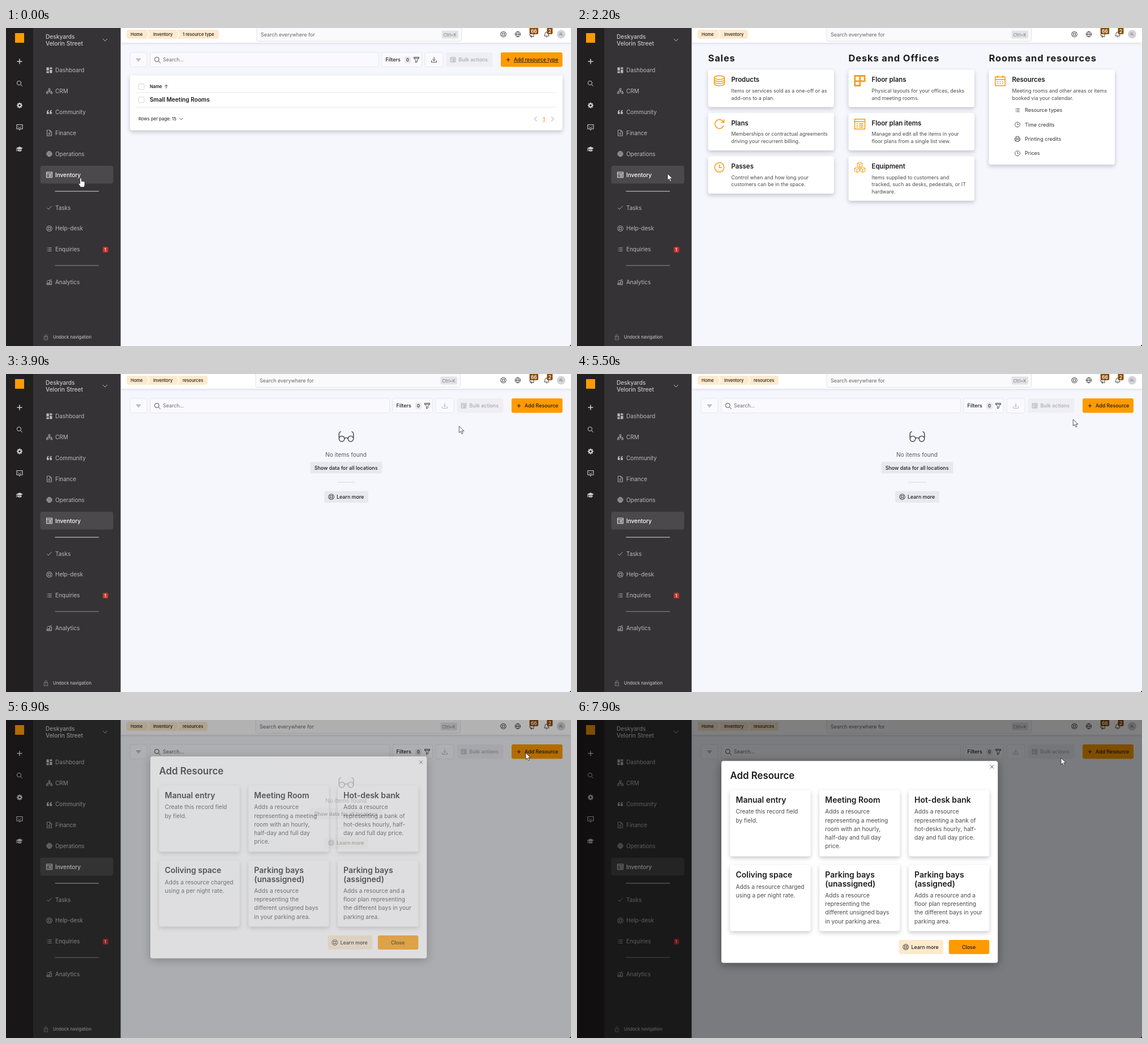
Write an HTML page that moves like this. It is 998x561 px and loops after 8000 ms.

```html
<!DOCTYPE html>
<html lang="en">
<head>
<meta charset="utf-8">
<title>Workspace admin</title>
<style>
html, body { margin: 0; width: 100%; height: 100%; overflow: hidden; background: #f6f7fd; }
svg { display: block; width: 998px; height: 561px; font-family: Inter, "Noto Sans", sans-serif; font-optical-sizing: none; }
text { white-space: pre; }
.card { fill: #fff; filter: drop-shadow(0 var(--drop, 3px) var(--blur, 3.5px) rgba(30, 30, 50, .24)); }
.anim { animation: 8s -5ms infinite step-end; }
.list { animation-name: list; }
.hub { animation-name: hub; }
.empty { animation-name: empty; }
.lift { animation-name: lift; }
.link { animation-name: link; }
.add { animation-name: add; }
.dim { animation-name: dim; }
.modal { animation-name: modal; }
.cursor { animation-name: cursor; }
.hand { animation-name: hand; }
.arrow { animation-name: arrow; }
@keyframes list { 0% { opacity: 1 } 11.25%, 100% { opacity: 0 } }
@keyframes hub {
  0% { opacity: 0 } 11.25% { opacity: .5 } 12.5% { opacity: .85 }
  13.75% { opacity: 1 } 48.75%, 100% { opacity: 0 }
}
@keyframes empty { 0% { opacity: 0 } 48.75%, 100% { opacity: 1 } }
@keyframes lift {
  0% { translate: 0 0; --drop: 3px; --blur: 3.5px }
  33.75% { translate: 0 -1px; --drop: 7px; --blur: 8px }
  48.75%, 100% { translate: 0 0; --drop: 3px; --blur: 3.5px }
}
@keyframes link {
  0% { text-decoration: none } 33.75% { text-decoration: underline } 48.75%, 100% { text-decoration: none }
}
@keyframes add {
  0% { text-decoration: none } 80% { text-decoration: underline } 86.25%, 100% { text-decoration: none }
}
@keyframes dim { 0% { opacity: 0 } 86.25% { opacity: .6 } 87.5%, 100% { opacity: 1 } }
@keyframes modal {
  0% { opacity: 0; translate: 0 -10px }
  86.25% { opacity: .6; translate: 0 -8px }
  87.5% { opacity: 1; translate: 0 -2.2px; animation-timing-function: steps(5) }
  93.75%, 100% { opacity: 1; translate: 0 0 }
}
@keyframes cursor {
  0% { translate: 132px 265px }
  2.5% { translate: 131.5px 263.5px }
  3.75% { translate: 131.5px 262px }
  26.25% { translate: 135px 261px }
  27.5% { translate: 160px 257px }
  28.75% { translate: 230px 245px }
  30% { translate: 367px 221px }
  31.25% { translate: 566px 183px }
  32.5% { translate: 703px 155px }
  33.75% { translate: 769px 135px }
  35% { translate: 790px 108px }
  36.25% { translate: 799px 96px; animation-timing-function: steps(5) }
  42.5% { translate: 800.5px 92px }
  56.25% { translate: 800.5px 92px; animation-timing-function: steps(5) }
  62.5% { translate: 853px 80px }
  63.75% { translate: 853px 80px; animation-timing-function: steps(6) }
  71.25% { translate: 888px 80px }
  72.5% { translate: 888px 80px; animation-timing-function: steps(9) }
  83.75% { translate: 918px 58px }
  97.5% { translate: 890px 62px }
  98.75%, 100% { translate: 855px 67px }
}
@keyframes hand {
  0% { opacity: 1 } 26.25% { opacity: 0 } 33.75% { opacity: 1 }
  48.75% { opacity: 0 } 80% { opacity: 1 } 86.25%, 100% { opacity: 0 }
}
@keyframes arrow {
  0% { opacity: 0 } 26.25% { opacity: 1 } 33.75% { opacity: 0 }
  48.75% { opacity: 1 } 80% { opacity: 0 } 86.25%, 100% { opacity: 1 }
}
</style>
</head>
<body>
<svg id="stage" viewBox="0 0 998 561"></svg>
<script>
const UI = 0.635; // interface zoom: sizes below are in unzoomed pixels
const ORANGE = '#ff9b00', CREAM = '#fdeacd', INK = '#1d1b1c', SOFT = '#4d4b4d', NAV = '#b9b8b9';

const ring = (x, y, r) => `M${x - r} ${y}a${r} ${r} 0 1 0 ${2 * r} 0a${r} ${r} 0 1 0 ${-2 * r} 0`;
const cube = (x, y) =>
  `M${x} ${y - 2.7}l2.4 1.2v2.8l-2.4 1.3-2.4-1.3v-2.8zM${x - 2.4} ${y - 1.5}l2.4 1.2 2.4-1.2M${x} ${y - .3}v2.9`;

const ICONS = {
  dashboard: 'M-5-5h4.3v5.6h-4.3zM.7-5h4.3v3h-4.3zM-5 1.8h4.3v3.2h-4.3zM.7-.8h4.3v5.8h-4.3z',
  quote: 'M-4.5 3.5V0q0-3.4 3.5-3.8v1.4q-1.6.4-1.6 2.1h1.8v3.8zM.8 3.5V0q0-3.4 3.5-3.8v1.4q-1.6.4-1.6 2.1h1.8v3.8z',
  cap: 'M-6-1.5L0-4.2 6-1.5 0 1.2zM-3.5.6L0 2.2 3.5.6v2.6q-3.5 2-7 0zM-5.5-1h1v5h-1z',
  tree: 'M-1.4-4.5h2.8v2.6h-2.8zM-5 1.8h2.6v2.6h-2.6zM2.4 1.8h2.6v2.6h-2.6zM0-1.9V0M-3.7 1.8V0h7.4v1.8M0 0v3',
  doc: 'M-4-5h5l3 3v7h-8zM1-5v3h3M-2 .3h4M-2 2.5h4',
  chip: ring(0, 0, 4.6) + 'M-2.4-2.4h4.8v4.8h-4.8zM-1-1h2v2h-2zM-1-4.5v2M1-4.5v2M-1 2.5v2M1 2.5v2M-4.5-1h2M-4.5 1h2M2.5-1h2M2.5 1h2',
  table: 'M-5-4.8h10v9.6h-10zM-5-2.3h10M-3.2-.4h1.2M-.6-.4h4M-3.2 1.2h1.2M-.6 1.2h4M-3.2 2.9h1.2M-.6 2.9h4',
  check: 'M-4 .3l2.4 2.7 5.6-5.8',
  buoy: ring(0, 0, 4.8) + ring(0, 0, 2.2) + 'M-3.4-3.4l1.8 1.8M3.4-3.4l-1.8 1.8M-3.4 3.4l1.8-1.8M3.4 3.4l-1.8-1.8',
  list: 'M-4-2.8h1M-2-2.8h6M-4 0h1M-2 0h6M-4 2.8h1M-2 2.8h6',
  chart: 'M-4.5 4.5v-3h2.5v3zM-2 4.5v-3h3v3zM1 4.5v-6.5h3v6.5zM-4.5-1l3-2h2l3.5-2',
  plus: 'M-4.5 0h9M0-4.5v9',
  search: ring(-1, -1, 3.6) + 'M1.8 1.8l3 3',
  gear: ring(0, 0, 2.7) + 'M0-5v2M0 3v2M-5 0h2M3 0h2M-3.5-3.5l1.4 1.4M3.5 3.5l-1.4-1.4M3.5-3.5l-1.4 1.4M-3.5 3.5l1.4-1.4',
  chat: 'M-5-4.5h10v7.5h-3.5l-1.5 2-1.5-2h-3.5zM-2.2-1.7v1M2.2-1.7v1M-2 .7q2 1.2 4 0',
  lock: 'M-3.5-1h7v6h-7zM-2-1v-2a2 2 0 0 1 4 0v2M0 1.2v1.6',
  down: 'M-4-2l4 4 4-4',
  left: 'M2-4l-4 4 4 4',
  right: 'M-2-4l4 4-4 4',
  up: 'M0 4v-8M-3.5-.5l3.5-3.5 3.5 3.5',
  close: 'M-3-3l6 6M3-3l-6 6',
  sort: 'M-4-2h8M-2.4 0h4.8M-.9 2h1.8',
  funnel: 'M-4.5-4.5h9v1.8l-3.2 3.2v3.3l-2.6 1.2v-4.5l-3.2-3.2zM-4.5-2.5h9',
  download: 'M0-4.5v6M-2.5-.8l2.5 2.5 2.5-2.5M-4.5 1.5v2.8h9v-2.8',
  globe: ring(0, 0, 4.7) + 'M-4.7 0h9.4M0-4.7q-4.4 4.7 0 9.4M0-4.7q4.4 4.7 0 9.4',
  horn: 'M-4.5-1l7-2.5v7l-7-2.5zM-3 1.2l.8 3h1.6l-.6-2.4',
  bell: 'M-4.3 2.5q1.4-1.2 1.4-4a2.9 2.9 0 0 1 5.8 0q0 2.8 1.4 4zM-1.2 4.3h2.4',
  glasses: ring(-3.1, 1.3, 1.9) + ring(3.1, 1.3, 1.9) + 'M-1.2 1q1.2-.8 2.4 0M-5 1v-3q0-1.4 1.4-1.6M5 1v-3q0-1.4-1.4-1.6',
  stack: 'M-5-3a5 1.8 0 0 1 10 0a5 1.8 0 0 1-10 0v6a5 1.8 0 0 0 10 0v-6M-5-1a5 1.8 0 0 0 10 0M-5 1a5 1.8 0 0 0 10 0',
  cycle: 'M4.2 1.3A4.4 4.4 0 1 1 2.8-3.4L4.4-1.8M4.5-4.6V-1.7H1.6',
  clock: ring(0, 0, 4.6) + 'M0-2.8V.2H2.3',
  plan: 'M-4.8-4.8h5v9.6h-5zM.2-4.8h4.6v5.2h-9.6',
  boxes: cube(0, -2.5) + cube(-2.8, 2.4) + cube(2.8, 2.4),
  calendar: 'M-4.8-3.8h9.6v8.6h-9.6zM-4.8-1.3h9.6M-2.5-5.2v2.4M2.5-5.2v2.4M-3 .8h1.2M-.6.8h1.2M1.8.8h1.2M-3 2.8h1.2M-.6 2.8h1.2M1.8 2.8h1.2',
  printer: 'M-2.8-1.5v-3.2h5.6v3.2M-2.8 2.5h-2v-4h9.6v4h-2M-2.8.8h5.6v3.8h-5.6z'
};
const SOLID = ['dashboard', 'quote', 'cap'];

const icon = (name, x, y, color, scale = 1, width = 0.9) => {
  const paint = SOLID.includes(name)
    ? `fill="${color}"`
    : `fill="none" stroke="${color}" stroke-width="${width / scale}"`;
  return `<path d="${ICONS[name]}" transform="translate(${x} ${y}) scale(${scale})" ${paint}/>`;
};
// y is the middle of the capitals
const text = (x, y, str, size = 14, weight = 400, fill = INK, attrs = '') =>
  `<text x="${x}" y="${y + size * UI * 0.36}" font-size="${size * UI}" font-weight="${weight}" fill="${fill}" ${attrs}>${str}</text>`;
const lines = (x, y, rows, step, ...style) => rows.map((row, i) => text(x, y + i * step, row, ...style)).join('');
const box = (x, y, w, h, fill, r = 3, attrs = '') =>
  `<rect x="${x}" y="${y}" width="${w}" height="${h}" rx="${r}" fill="${fill}" ${attrs}/>`;
const outlined = (x, y, w, h, fill = '#fafafe', color = '#e2e2e9', r = 3) =>
  box(x, y, w, h, fill, r, `stroke="${color}" stroke-width=".8"`);
const card = (x, y, w, h) => box(x, y, w, h, '#fff', 4, 'class="card"');
const rule = (x, y, w, color, h = 1) => box(x, y - h / 2, w, h, color, 0);
const group = (cls, body) => `<g class="anim ${cls}">${body}</g>`;

function sidebar() {
  const items = [
    ['Dashboard', 'dashboard', 74.5], ['CRM', 'tree', 111.4], ['Community', 'quote', 148.3],
    ['Finance', 'doc', 185.2], ['Operations', 'chip', 222.1], ['Inventory', 'table', 259],
    ['Tasks', 'check', 317], ['Help-desk', 'buoy', 353.8], ['Enquiries', 'list', 390.7], ['Analytics', 'chart', 448.3]
  ];
  const rail = [['plus', 59, 1.5], ['search', 98, 1], ['gear', 136.5, 2], ['chat', 175, 1.1], ['cap', 213.5, 1]];
  return box(0, 0, 202.5, 561, '#353335', 0) + box(0, 0, 48, 561, '#221f21', 0) +
    box(16, 9, 16, 17, ORANGE, 0) +
    rail.map(([name, y, width]) => icon(name, 24, y, '#d0cfd0', 1, width)).join('') +
    lines(70, 15, ['Deskyards', 'Velorin Street'], 12.5, 16, 500, '#c9c8c9') +
    icon('down', 175, 21, '#c9c8c9') +
    box(60.5, 243, 129, 31.5, '#4b494b', 4) +
    items.map(([label, name, y]) => {
      const on = label === 'Inventory';
      return icon(name, 76.5, y, on ? '#fff' : NAV) + text(87, y, label, 15.7, on ? 500 : 400, on ? '#fff' : NAV);
    }).join('') +
    rule(86.5, 288, 77.5, '#dcdbdc') + rule(86.5, 419, 77.5, '#8f8e8f') +
    box(171, 386, 9.5, 10, '#d92b2b', 2) + text(173.8, 391.1, '1', 11, 700, '#fff') +
    icon('lock', 70.5, 545.5, '#8a898a', .9) + text(83, 545.3, 'Undock navigation', 12, 500, NAV);
}

function topBar() {
  const badge = (x, w, label) => box(x, -1, w, 12, '#8a4b08', 2.5) + text(x + 2.6, 5.8, label, 13, 600, '#fff');
  return box(202.5, 0, 796, 26, '#fff', 0, 'style="filter:drop-shadow(0 1px 2px rgba(30,30,60,.15))"') +
    icon('buoy', 878.5, 11, '#333') + icon('globe', 904, 11, '#333') +
    icon('horn', 929.5, 12, '#333') + icon('bell', 955, 11.5, '#333') +
    badge(924.7, 15.5, '66') + badge(955.5, 10, '2') +
    `<circle cx="980.5" cy="11" r="7.5" fill="#d3d3d8"/>` + text(977, 11.2, 'AL', 9, 500, '#77777d');
}

function trail(searchX, end, last) {
  const chevron = x => `<path d="M${x} 2.5l4.5 8.5-4.5 8.5" fill="none" stroke="#fff" stroke-width="1.6"/>`;
  return box(213, 3, end - 213, 16, CREAM, 4) +
    text(220, 11, 'Home', 12, 500) + chevron(248.5) + text(260, 11, 'Inventory', 12, 500) +
    (last ? chevron(301.5) + text(312, 11, last, 12, 500) : '') +
    outlined(searchX, -5, 361.5, 28.5, '#fafafc', '#dcdce2') +
    text(searchX + 7, 11.5, 'Search everywhere for', 14, 400, '#66656a') +
    box(searchX + 326.5, 4.5, 29.5, 14, '#e3e3e8', 2) + text(searchX + 329.5, 11.8, 'Ctrl+K', 12, 400, '#77777d');
}

function toolbar(shift, label, attrs, saveColor) {
  const faint = '#a9a9b1', at = x => x + shift;
  return outlined(219, 43, 30, 25.5) + icon('sort', 234, 56.5, '#777') +
    outlined(254.5, 43, 404 + shift, 25.5) + icon('search', 267.5, 56.5, '#333', 1.1) +
    text(277, 56, 'Search...', 14, 400, '#6a696e') +
    outlined(at(663.5), 43, 71, 25.5) + text(at(670.5), 56, 'Filters', 14, 500) +
    box(at(704), 50.5, 11, 11.5, '#e6e6eb', 3) + text(at(707), 56.2, '0', 12, 500) + icon('funnel', at(725), 56, '#333') +
    outlined(at(740), 43, 32, 25.5) + icon('download', at(756), 56, saveColor) +
    box(at(777.5), 43, 82, 25.5, '#eeeef4') + icon('table', at(789.5), 56, faint, .85) +
    text(at(799.5), 56, 'Bulk actions', 14, 500, faint) +
    box(at(874), 43, 983 - at(874), 25.5, ORANGE) + icon('plus', at(887), 56, INK, .7, 1.1) +
    text(at(897), 56, label, 14, 500, INK, attrs);
}

function listPage() {
  const tick = y => outlined(234, y - 5, 10, 10, '#fff', '#c9c9d0', 2);
  return trail(443, 376, '1 resource type') + toolbar(0, 'Add resource type', 'text-decoration="underline"', '#333') +
    card(219, 83.5, 764, 97) +
    tick(103.5) + text(254, 103.7, 'Name', 12, 600) + icon('up', 283, 103.5, '#333', .8) + rule(229, 114, 744, '#e9e9ef') +
    tick(126.7) + text(254, 126.8, 'Small Meeting Rooms', 16, 600) + rule(229, 139.5, 744, '#e9e9ef') +
    text(234, 160, 'Rows per page: 15', 12.2) + icon('down', 309.5, 160.3, '#333', .75) +
    icon('left', 935.5, 160.3, '#888') + text(948.3, 160.3, '1', 14, 500, '#f08f00', 'text-decoration="underline"') +
    icon('right', 965.3, 160.3, '#888');
}

function hubCard(x, y, h, name, title, body, attrs, width = 1.5) {
  return card(x, y, 222.5, h) + icon(name, x + 20, y + 19.5, '#f59a0b', 1.8, width) +
    text(x + 41, y + 17.7, title, 18, 600, INK, attrs) + lines(x + 41, y + 37.2, body, 12.7, 14, 400, SOFT);
}

function hubPage() {
  const heads = [[231.5, 'Sales'], [479.5, 'Desks and Offices'], [727.5, 'Rooms and resources']];
  const links = [['Resource types', 'list'], ['Time credits', 'clock'], ['Printing credits', 'printer'], ['Prices', 'clock']];
  return trail(441, 302) +
    heads.map(([x, title]) => text(x, 53.5, title, 26, 700, INK, 'letter-spacing=".85"')).join('') +
    hubCard(231.5, 73.5, 66, 'stack', 'Products', ['Items or services sold as a one-off or as', 'add-ons to a plan.']) +
    hubCard(231.5, 150, 66, 'cycle', 'Plans', ['Memberships or contractual agreements', 'driving your recurrent billing.']) +
    hubCard(231.5, 226.3, 66, 'clock', 'Passes', ['Control when and how long your', 'customers can be in the space.']) +
    hubCard(479.5, 73.5, 66, 'plan', 'Floor plans', ['Physical layouts for your offices, desks', 'and meeting rooms.'], '', 2.6) +
    hubCard(479.5, 150, 66, 'table', 'Floor plan items', ['Manage and edit all the items in your', 'floor plans from a single list view.']) +
    hubCard(479.5, 226.3, 78.5, 'boxes', 'Equipment',
      ['Items supplied to customers and', 'tracked, such as desks, pedestals, or IT', 'hardware.'], '', 1) +
    group('lift',
      hubCard(727.5, 73.5, 167.5, 'calendar', 'Resources',
        ['Meeting rooms and other areas or items', 'booked via your calendar.'], 'class="anim link"') +
      links.map(([label, name], i) =>
        icon(name, 778, 145 + i * 25.4, '#444', .95) + text(791, 145 + i * 25.4, label, 14.2, 400, '#333')).join(''));
}

function emptyPage() {
  return trail(441, 356, 'resources') + toolbar(19, 'Add Resource', 'class="anim add"', '#a9a9b1') +
    icon('glasses', 601, 111, '#555', 2.55, 1.6) +
    text(564, 142.3, 'No items found', 16, 400, '#5b5a5e') +
    box(537.5, 155, 127, 20.5, '#e8e8ee', 2) + text(544.7, 165.4, 'Show data for all locations', 14, 500) +
    rule(585, 191, 32, '#d4d4da') +
    box(562, 206.5, 78, 20.5, '#e8e8ee', 2) + icon('buoy', 574.5, 216.7, INK) + text(584, 216.8, 'Learn more', 14, 500);
}

function dialog() {
  const choices = [
    [['Manual entry'], ['Create this record field', 'by field.']],
    [['Meeting Room'], ['Adds a resource', 'representing a meeting', 'room with an hourly,', 'half-day and full day', 'price.']],
    [['Hot-desk bank'], ['Adds a resource', 'representing a bank of', 'hot-desks hourly, half-', 'day and full day price.']],
    [['Coliving space'], ['Adds a resource charged', 'using a per night rate.']],
    [['Parking bays', '(unassigned)'], ['Adds a resource', 'representing the', 'different unsigned bays', 'in your parking area.']],
    [['Parking bays', '(assigned)'], ['Adds a resource and a', 'floor plan representing', 'the different bays in your', 'parking area.']]
  ];
  return box(255, 72.2, 488.3, 356.3, '#fff', 4, 'style="filter:drop-shadow(0 3px 8px rgba(0,0,0,.4))"') +
    icon('close', 733, 82.5, '#333') + text(270.5, 98, 'Add Resource', 26.5, 600) +
    choices.map(([title, body], i) => {
      const x = 270.3 + (i % 3) * 157.8, y = 123.4 + Math.floor(i / 3) * 132.2;
      return card(x, y, 142.5, 117) + lines(x + 10.2, y + 17.8, title, 15.2, 22, 600) +
        lines(x + 10.2, y + 23.2 + title.length * 15.2, body, 15.24, 16, 400, SOFT);
    }).join('') +
    box(568.5, 388, 78.5, 25, CREAM) + icon('buoy', 580.7, 400.5, INK) + text(590.5, 400.5, 'Learn more', 14, 500) +
    box(656.8, 388, 71.5, 25, ORANGE) + text(680, 400.5, 'Close', 14, 500);
}

const pointer = (cls, d) =>
  `<path class="anim ${cls}" d="${d}" fill="#fff" stroke="#222" stroke-width=".8" stroke-linejoin="round"/>`;

document.getElementById('stage').innerHTML =
  box(202, 0, 796, 561, '#f6f7fd', 0) + topBar() +
  group('list', listPage()) + group('hub', hubPage()) + group('empty', emptyPage()) +
  sidebar() +
  group('dim', box(0, 0, 998, 561, 'rgba(0,0,0,.5)', 0)) +
  group('modal', dialog()) +
  '<path d="M998 557v4h-4a4 4 0 0 0 4-4"/>' +
  group('cursor',
    pointer('hand', 'M-1.4 9V1a1.4 1.4 0 0 1 2.8 0v4.5q1.2-.9 2.2.2 1.3-.7 2 .4 1.5-.4 1.6 1.2v3.7q0 1.6-1.2 4.8h-6.4q-.6-1.8-3.2-5-.9-1.4.3-1.8.9-.1 1.9 1z') +
    pointer('arrow', 'M0 0v11.5l2.7-2.4 2 4.6 2-.9-2-4.4h3.8z'));
</script>
</body>
</html>
```
